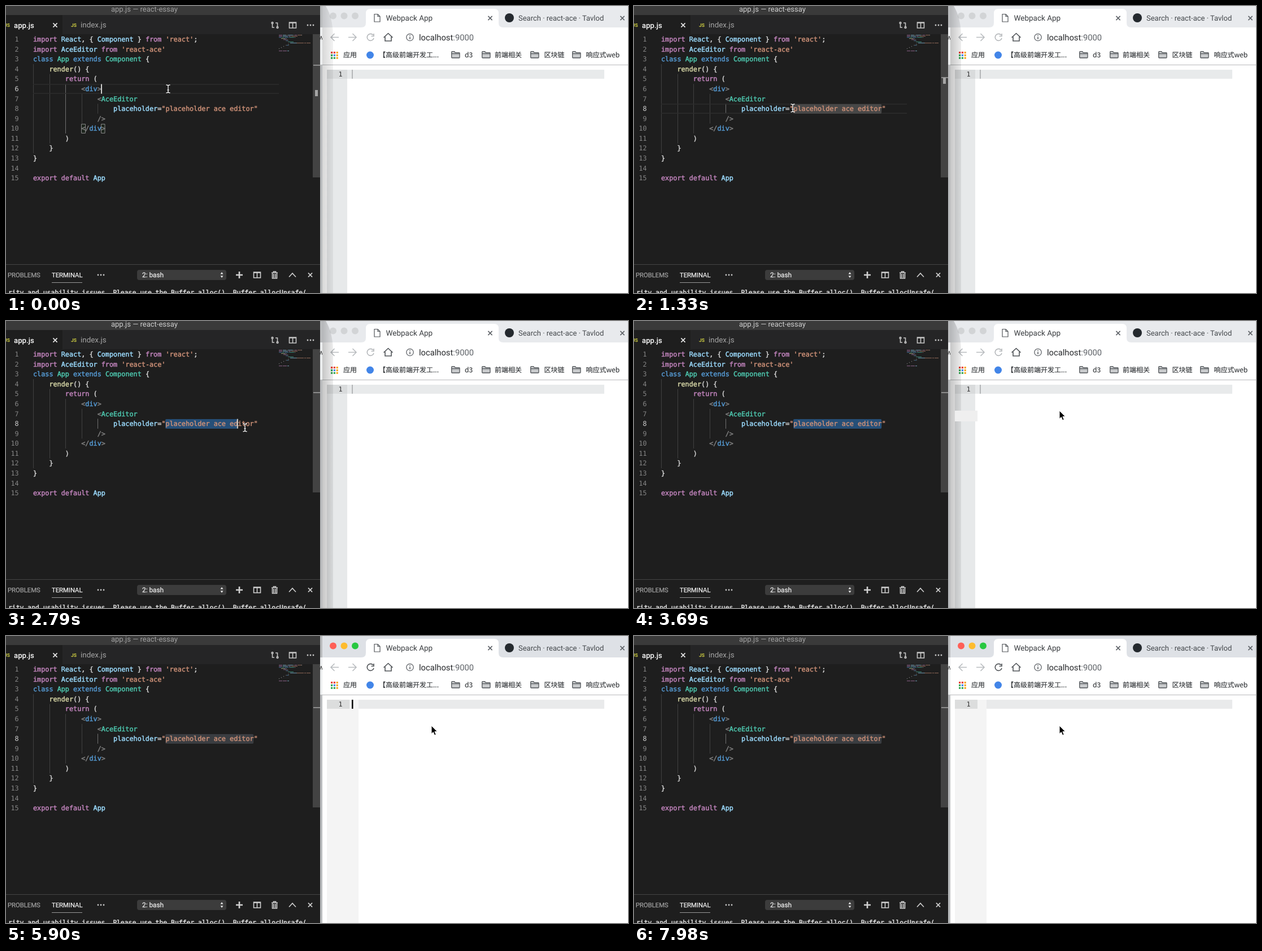
Animation of 1101 by 509 pixels, one loop 8000 ms. Source, as an HTML page:

```html
<!DOCTYPE html>
<html lang="en">
<head>
<meta charset="utf-8">
<title>Editor and browser</title>
<style>
html, body { margin: 0; width: 100%; height: 100%; overflow: hidden; background: #fff; }
svg { display: block; width: 1101px; height: 509px; }
text { font-family: Roboto, Inter, sans-serif; white-space: pre; text-rendering: geometricPrecision; }
.mono text, text.mono { font: 11.8px "DejaVu Sans Mono", monospace; stroke-width: .45px; }
.cjk text { font: 12px "Noto Sans CJK SC", "Noto Sans CJK", sans-serif; fill: #333639; stroke: #333639; stroke-width: .15px; }
.line { fill: none; stroke-width: 1.6; }
</style>
</head>
<body>
<svg viewBox="0 0 1101 509" xmlns="http://www.w3.org/2000/svg">
  <defs>
    <clipPath id="editorClip"><path d="M0 0H556V509H0z"/></clipPath>
    <clipPath id="gapClip"><path d="M556 38H560V104H556z"/></clipPath>
    <linearGradient id="shade"><stop stop-opacity=".22"/><stop offset="1" stop-opacity=".07"/></linearGradient>
    <g id="close"><path d="M-3.6-3.6 3.6 3.6M3.6-3.6-3.6 3.6" class="line"/></g>
    <g id="dots"><circle cx="-5" r="1.4"/><circle r="1.4"/><circle cx="5" r="1.4"/></g>
    <g id="split" class="line"><path d="M-6-5H6V5H-6zM0-5V5M-6-4H6"/></g>
    <path id="folder" d="M.7 1.7Q.7.7 1.7.7H5.5L7.3 2.6H14Q15 2.6 15 3.6V11Q15 12 14 12H1.7Q.7 12 .7 11zM.7 4.6H15" fill="#c9cbcd" stroke="#505458" stroke-width="1.3"/>
  </defs>

  <g id="editor" clip-path="url(#editorClip)">
    <path fill="#1e1e1e" d="M0 0H556V509H0z"/>
    <path fill="#3a3a3a" d="M0 0H556V16H0z"/>
    <path fill="#252526" d="M0 16H556V50H0z"/>
    <path fill="#1e1e1e" d="M0 16H100V50H0z"/>
    <text id="title" x="186" y="10" font-size="13">app.js — react-essay</text>
    <g font-size="8.5" font-weight="700" fill="#cbcb41"><text x="-3" y="37">JS</text><text x="115" y="37">JS</text></g>
    <text x="14" y="39" font-size="13.2" font-weight="500" fill="#fff">app.js</text>
    <text x="132" y="38" font-size="13.4" fill="#a6a6a6">index.js</text>
    <use href="#close" x="87" y="34" stroke="#e8e8e8"/>
    <g stroke="#c5c5c5" class="line">
      <circle cx="471.500" cy="30" r="1.4"/><circle cx="480.500" cy="38" r="1.4"/>
      <path d="M471.500 31.500V38H475M480.500 36.500V30H477"/>
      <use href="#split" x="507.500" y="34"/>
    </g>
    <use href="#dots" x="539" y="34" fill="#c5c5c5"/>

    <g id="guides" fill="#404040"></g>
    <path id="activeGuide" fill="#707070"/>
    <path id="currentLine" fill="none" stroke="#2d2d2d" stroke-width="1.5"/>
    <g id="brackets" fill="#1d251d" stroke="#888"><path d="M133.500 209.500h7v16h-7zM168.500 209.500h6.500v16h-6.500z"/></g>
    <rect id="selection" x="282" y="174" height="17" rx="2"/>
    <g id="code" class="mono"></g>
    <g id="numbers" class="mono" text-anchor="end"></g>
    <g id="minimap" opacity=".55"></g>
    <rect id="caret" width="2" height="17" fill="#d0d0ce"/>

    <path fill="#434343" d="M543 50H556V304H543z"/>
    <rect id="rulerLine" x="544" width="12" height="2" fill="#8c8c8c"/>
    <rect id="rulerMark" x="547" width="5" height="11" fill="#a5a5a5"/>

    <path fill="#1e1e1e" d="M0 458H556V509H0z"/>
    <path fill="#454545" d="M0 458H556V459H0z"/>
    <g font-size="11.25" stroke-width=".25">
      <text x="3" y="481" fill="#a0a0a0" stroke="#a0a0a0">PROBLEMS</text>
      <text x="81" y="481" fill="#f0f0f0" stroke="#f0f0f0">TERMINAL</text>
    </g>
    <path fill="#999" d="M81 490H135V491H81z"/>
    <use href="#dots" x="168" y="477" fill="#c5c5c5"/>
    <rect x="232" y="468" width="158" height="18" rx="4" fill="#3c3c3c"/>
    <text x="241" y="481" font-size="11.8" fill="#f0f0f0" stroke="#f0f0f0" stroke-width=".25">2: bash</text>
    <path d="M379.500 475.500 382 472 384.500 475.500zM379.500 478.500 382 482 384.500 478.500z" fill="#eee"/>
    <g stroke="#d0d0d0" class="line">
      <path d="M407 477H419M413 471V483" stroke-width="2.6"/>
      <use href="#split" x="444.500" y="477"/>
      <path d="M470 473H481M473.500 472.500V471H477.500V472.500M471.500 474V483H479.500V474M474 475V482M477 475V482"/>
      <path d="M501 480.500 507 474 513 480.500"/>
      <use href="#close" x="538.500" y="477" stroke-width="2"/>
    </g>
    <text class="mono" x="4" y="511.500" style="font-size:11.4px" fill="#e5e5e5" stroke="#e5e5e5">rity and usability issues. Please use the Buffer.alloc(), Buffer.allocUnsafe(</text>
  </g>

  <path fill="#b9bbbd" d="M556 0H560V509H556z"/>
  <path fill="#eceeef" d="M556 38H560V104H556z"/>
  <text x="553" y="60" font-size="13" fill="#333" clip-path="url(#gapClip)">w</text>

  <g id="browser">
    <path fill="#fff" d="M560 0H1101V509H560z"/>
    <path id="tabBar" d="M560 0H1101V38H560z"/>
    <path fill="#fff" d="M629 38Q637 38 637 30V13Q637 5 645 5H864Q872 5 872 13V30Q872 38 880 38z"/>
    <g id="lights"><circle cx="579" cy="17.500" r="6"/><circle cx="598.500" cy="17.500" r="6"/><circle cx="618" cy="17.500" r="6"/></g>
    <path d="M652 14.500H658L662 18.500V28H652zM658 14.500V18.500H662" class="line" style="stroke-width:1.2" stroke="#505458"/>
    <text x="672.500" y="25.500" font-size="13.5" fill="#3a3d40">Webpack App</text>
    <circle cx="891" cy="21" r="8" fill="#24292e"/>
    <text x="907" y="25.500" font-size="13" fill="#45494d">Search · react-ace · Tavlod</text>
    <g stroke="#5f6368"><use href="#close" x="857" y="21.500"/><use href="#close" x="1091" y="21.500"/></g>

    <g class="line" stroke="#b9bcbf">
      <path d="M589 55.500H575.500M581.500 49 575 55.500 581.500 62M606 55.500H619.500M613.500 49 620 55.500 613.500 62"/>
      <path id="reload" d="M649.800 51.500A6 6 0 1 0 651 57M651 49V53.500H646.500"/>
      <path stroke="#505458" d="M668.500 56 676.500 48.500 684.500 56M671 54.500V62H682V54.500"/>
      <circle cx="715" cy="55.500" r="6.200" stroke="#5f6368" stroke-width="1.300"/>
      <path stroke="#5f6368" d="M715 54.500V59M715 51.500V53"/>
    </g>
    <text x="731" y="60.500" font-size="14.75" fill="#27292c">localhost<tspan fill="#5f6368">:9000</tspan></text>

    <g id="apps"></g>
    <circle cx="644.500" cy="87" r="6.500" fill="#4285e8"/>
    <g class="cjk">
      <text x="597" y="91">应用</text><text x="660" y="91">【高级前端开发工...</text>
      <text x="812" y="91">d3</text><text x="865" y="91">前端相关</text>
      <text x="952.500" y="91">区块链</text><text x="1026.500" y="91">响应式web</text>
    </g>
    <use href="#folder" x="788" y="80"/><use href="#folder" x="842" y="80"/>
    <use href="#folder" x="928" y="80"/><use href="#folder" x="1002" y="80"/>
    <path fill="#b8babc" d="M560 104H1101V105H560z"/>

    <g id="idlePage">
      <path fill="#e7e9ea" d="M568 113H604V509H568z"/>
      <path fill="#d9dbdc" d="M568 113H604V129H568z"/>
      <path fill="#e8eaeb" d="M604 113H1059V129H604z"/>
      <path fill="#b4b6b8" d="M612 113H614V129H612z"/>
      <path id="shadow" fill="url(#shade)" d="M560 0H566Q578 20 579 50V509H560z"/>
    </g>
    <g id="livePage">
      <path fill="#f4f4f4" d="M568 113H624V509H568z"/>
      <path fill="#dcdddd" d="M568 113H608V129H568z"/>
      <path fill="#e9eaeb" d="M624 113H1059V129H624z"/>
      <path id="pageCaret" fill="#000" d="M612 113H614.500V129H612z"/>
    </g>
    <path id="trail" fill="#efefef" d="M568 159H608V178H568z"/>
    <text class="mono" x="588.500" y="125" fill="#333">1</text>
  </g>

  <g id="beam" fill="none">
    <path stroke="#f2f2f2" stroke-width="1.300" d="M-3.500-7Q0-7 0-5Q0-7 3.500-7M0-5V5M-3.500 7Q0 7 0 5Q0 7 3.500 7M-1.500 2H1.500"/>
  </g>
  <path id="arrow" d="M0 0V14.500L3.300 11.500 5.600 17 8.200 15.900 5.900 10.600H10.500z" fill="#000" stroke="#fff" stroke-width="1"/>
</svg>
<script>
const $ = id => document.getElementById(id);
const NS = "http://www.w3.org/2000/svg";
const LOOP = 8000, LEFT = 48, CHAR = 7.1, ROW = 17.57, TOP = 50.4;
const rowTop = n => TOP + ROW * (n - 1);

function add(parent, tag, attrs, content) {
  const node = document.createElementNS(NS, tag);
  for (const key in attrs) node.setAttribute(key, attrs[key]);
  if (content !== undefined) node.textContent = content;
  parent.append(node);
  return node;
}
const show = (id, on) => { $(id).style.display = on ? "" : "none"; };
const set = (id, attrs) => { for (const key in attrs) $(id).setAttribute(key, attrs[key]); };

// Each line alternates a colour key and its text.
const colors = { k: "#c586c0", v: "#9cdcfe", s: "#ce9178", b: "#569cd6", c: "#4ec9b0", f: "#dcdcaa", p: "#d4d4d4", t: "#808080" };
const source = [
  "k|import |v|React|p|, { |v|Component|p| } |k|from |s|'react'|p|;",
  "k|import |v|AceEditor |k|from |s|'react-ace'",
  "b|class |c|App |b|extends |c|Component |p|{",
  "f|    render|p|() {",
  "k|        return |p|(",
  "t|            <|b|div|t|>",
  "t|                <|c|AceEditor",
  "v|                    placeholder|p|=|s|\"placeholder ace editor\"",
  "t|                />",
  "t|            </|b|div|t|>",
  "p|        )",
  "p|    }",
  "p|}",
  "",
  "k|export default |v|App"
];

const numbers = source.map((line, i) => {
  const n = i + 1, parts = line.split("|");
  const text = add($("code"), "text", { x: LEFT, y: rowTop(n) + 12.8 });
  let col = 0;
  for (let j = 0; j + 1 < parts.length; j += 2) {
    const fill = colors[parts[j]], word = parts[j + 1];
    add(text, "tspan", { fill, stroke: fill }, word);
    for (const m of word.matchAll(/\S+/g))
      add($("minimap"), "rect", { x: 483 + col + m.index, y: 51 + 2 * i, width: m[0].length, height: 1.2, fill });
    col += word.length;
  }
  return add($("numbers"), "text", { x: 22.6, y: rowTop(n) + 12.8 }, n);
});

// Column, first line and last line of every indent guide.
for (const [col, from, to] of [[0, 4, 12], [4, 5, 11], [8, 6, 10], [12, 7, 9], [16, 8, 8]])
  add($("guides"), "rect", { x: Math.ceil(LEFT + col * CHAR), y: rowTop(from), width: 1, height: ROW * (to - from + 1) });

["#ea4335", "#ea4335", "#f5a623", "#34a853", "#4285f4", "#f5a623", "#34a853", "#34a853", "#f5a623"].forEach((fill, i) =>
  add($("apps"), "rect", { x: 575 + i % 3 * 4.8, y: 81 + Math.floor(i / 3) * 4.8, width: 3.2, height: 3.2, fill }));

const CLICK = 885, WORD = 1032, DRAG = 1620, SWITCH = 3830;
const pointer = [
  [0, 287, 147], [150, 287, 150], [297, 288, 156], [444, 289, 164], [591, 289, 172], [738, 288, 178],
  [885, 287, 181], [1330, 281, 181], [1620, 283, 181], [1767, 290, 182], [1914, 303, 184], [2061, 318, 185],
  [2208, 334, 187], [2355, 352, 188], [2502, 373, 188], [2650, 394, 188], [2790, 423, 189], [2940, 436, 189],
  [3090, 441, 189], [3540, 582, 160], [3690, 753, 159]
];
const selected = [[DRAG, 0], [1767, 1], [1914, 3], [2061, 5], [2208, 7], [2355, 9], [2502, 12], [2650, 14], [2790, 18], [2940, 21], [3090, 22]];
const blink = [[0, 0], [SWITCH, 1], [4420, 0], [4870, 1], [5610, 0], [5900, 1], [6500, 0], [7380, 1], [7980, 0]];
const at = (steps, t) => steps.findLast(step => step[0] <= t) || steps[0];

function drawEditor(t) {
  const clicked = t >= CLICK, dragging = t >= DRAG, live = t < SWITCH;
  const row = clicked ? 8 : 6, y = rowTop(row);
  const cols = dragging ? at(selected, t)[1] : 22;

  set("title", { fill: clicked && live ? "#d0d0d0" : "#a0a0a0" });
  numbers.forEach((node, i) => node.setAttribute("fill", i + 1 === row ? "#d0d0d0" : "#858585"));
  set("activeGuide", { d: clicked ? `M162 ${y}h1v${ROW}h-1z` : `M105 ${y}h1v${ROW * 5}h-1z` });
  set("currentLine", { d: `M${LEFT} ${y + .7}H483M${LEFT} ${y + ROW - .7}H483` });
  show("currentLine", !dragging);
  show("brackets", !clicked);

  show("selection", t >= WORD);
  set("selection", { width: cols * CHAR, fill: !dragging ? "#474747" : live ? "#264f78" : "#3a3d41" });

  const caretOn = t < 1330 || (dragging && t < 3540);
  set("caret", { x: clicked ? 281 + (dragging ? cols * CHAR : 0) : 168, y: y + .3 });
  show("caret", caretOn);

  set("rulerLine", { y: clicked ? 126 : 104 });
  set("rulerMark", { y: clicked ? 127 : 149 });
  show("rulerMark", !dragging);
}

function drawBrowser(t) {
  const live = t >= SWITCH;
  set("tabBar", { fill: live ? "#dee1e6" : "#e8eaed" });
  const lights = live ? ["#ff5f57", "#febc2e", "#28c840"] : ["#d2d4d6", "#d2d4d6", "#d2d4d6"];
  [...$("lights").children].forEach((dot, i) => dot.setAttribute("fill", lights[i]));
  set("reload", { stroke: live ? "#505458" : "#b4b7ba" });
  set("shadow", { opacity: t < CLICK ? .7 : 1 });
  show("idlePage", !live);
  show("livePage", live);
  show("trail", t >= 3690 && !live);
  show("pageCaret", at(blink, t)[1]);
}

function drawPointer(t) {
  const [, x, y] = at(pointer, t), overPage = t >= 3540;
  show("beam", !overPage);
  show("arrow", overPage);
  set(overPage ? "arrow" : "beam", { transform: `translate(${x} ${y})` });
}

const start = performance.now();
function frame() {
  const t = (performance.now() - start) % LOOP;
  drawEditor(t);
  drawBrowser(t);
  drawPointer(t);
  requestAnimationFrame(frame);
}
frame();
</script>
</body>
</html>
```
